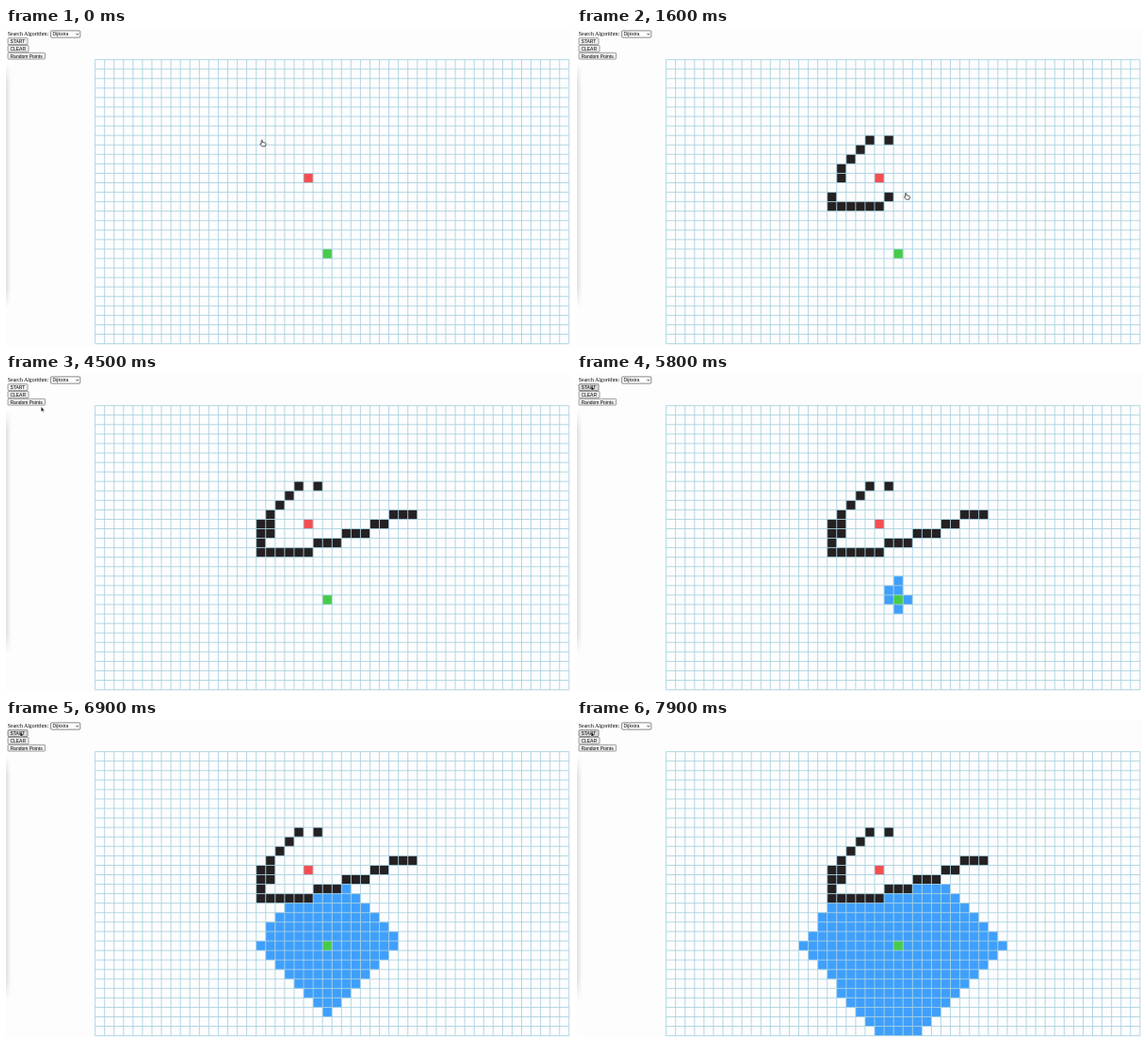
An HTML page that plays this animation: 600x338 px, repeating every 8 s.

```html
<!DOCTYPE html>
<html lang="en">
<head>
<meta charset="utf-8">
<title>Search visualizer</title>
<style>
  html, body { margin: 0; width: 100%; height: 100%; overflow: hidden; background: #fdfdfe; }
  svg { display: block; width: 600px; height: 338px; }
  .ui { font: 5px "Liberation Sans", Arial, sans-serif; fill: #000; }
  .label { font: 5.9px "Liberation Serif", "Times New Roman", serif; fill: #000; }
  .btn { fill: #efefef; stroke: #666; stroke-width: .6; }
  .btn.hover { fill: #dcdcdc; stroke: #444; }
</style>
</head>
<body>
<svg viewBox="0 0 600 338" xmlns="http://www.w3.org/2000/svg">
  <defs>
    <linearGradient id="fade">
      <stop offset="0" stop-color="#000" stop-opacity=".12"/>
      <stop offset=".5" stop-color="#000" stop-opacity=".05"/>
      <stop offset="1" stop-color="#000" stop-opacity="0"/>
    </linearGradient>
    <linearGradient id="ends" x2="0" y2="1">
      <stop offset="0" stop-color="#000"/>
      <stop offset=".08" stop-color="#fff"/>
      <stop offset=".92" stop-color="#fff"/>
      <stop offset="1" stop-color="#000"/>
    </linearGradient>
    <mask id="soft"><rect y="38" width="8" height="260" fill="url(#ends)"/></mask>
  </defs>
  <rect y="38" width="6" height="260" fill="url(#fade)" mask="url(#soft)"/>

  <text class="label" x="1.8" y="8.4">Search Algorithm:</text>
  <rect x="47.6" y="2.9" width="31.2" height="7.2" rx=".8" fill="#fff" stroke="#555" stroke-width=".7"/>
  <text class="ui" x="49.6" y="8.3">Dijkstra</text>
  <path d="M74.3 5.8l1.4 1.5 1.4-1.5" fill="none" stroke="#222" stroke-width=".8"/>

  <rect class="btn" id="start" x="2" y="10.7" width="21" height="6.8" rx=".8"/>
  <text class="ui" x="4.4" y="15.9">START</text>
  <rect class="btn" x="2" y="18.5" width="22" height="6.8" rx=".8"/>
  <text class="ui" x="4.4" y="23.7">CLEAR</text>
  <rect class="btn" x="2" y="26.3" width="39.5" height="6.8" rx=".8"/>
  <text class="ui" x="4.5" y="31.5">Random Points</text>

  <g id="cells"></g>
  <path id="lines" fill="none" stroke="#a6d0de" stroke-width=".85"/>

  <path id="hand" fill="#fff" stroke="#222" stroke-width=".75" stroke-linejoin="round"
    d="M-.6 .2Q0-.5 .6 .2V2.3L3.6 2.9Q4.4 3.2 4.3 4.1L3.6 6.6H.1L-1.8 4.2Q-1.8 3.3-.6 3.9Z"/>
  <path id="arrow" fill="#000" stroke="#fff" stroke-width=".5"
    d="M0 0V5.3L1.2 4.3 2 6.2 2.9 5.8 2.1 4H3.8Z"/>
</svg>
<script>
const LOOP = 8000, STEP = 100;
const COLS = 50, ROWS = 30, PITCH = 10.065, LEFT = 94.6, TOP = 33.65;
const SEARCH_AT = 5735, PER_CELL = 10, MAX_DIST = 12;
const GOAL = { c: 22, r: 12 }, ORIGIN = { c: 24, r: 20 };
const PEN = true;

// pointer key points: time, column, row, wall pen pressed
const keys = [
  [0, 17.1, 8.2], [200, 17.1, 8.2],
  [500, 23, 8, PEN], [550, 22, 8],
  [600, 21, 8, PEN], [900, 18, 11, PEN], [950, 18, 12, PEN], [975, 17.5, 13],
  [1000, 17, 14, PEN], [1100, 17, 15, PEN], [1400, 22, 15, PEN], [1500, 23, 14, PEN],
  [1600, 24.8, 13.8],
  [1610, 24, 14.07, PEN], [2000, 33, 10.65, PEN],
  [2200, 32.6, 11], [2900, 16.7, 13.1],
  [3000, 17, 13, PEN], [3100, 17, 12, PEN], [3200, 18, 13, PEN],
  [3500, 16.8, 12], [4400, -6.2, -.2], [4800, -6.2, -.2],
  [5500, -8.4, -2.4], [LOOP, -8.4, -2.4]
];

const $ = id => document.getElementById(id);
const px = c => LEFT + c * PITCH;
const py = r => TOP + r * PITCH;
const mix = (a, b, k) => a + (b - a) * k;
const id = (c, r) => `${c},${r}`;
const timed = [], walls = new Set();

function addCell({ c, r }, fill, at = 0) {
  const el = document.createElementNS("http://www.w3.org/2000/svg", "rect");
  const attrs = { x: px(c), y: py(r), width: PITCH, height: PITCH, fill };
  for (const k in attrs) el.setAttribute(k, attrs[k]);
  $("cells").append(el);
  if (at) timed.push({ el, at });
}

function addWall(col, row, at) {
  const c = Math.round(col), r = Math.round(row);
  if (walls.has(id(c, r))) return;
  walls.add(id(c, r));
  addCell({ c, r }, "#252022", at);
}

keys.forEach(([t, c, r, pen], i) => {
  if (!pen) return;
  const [t0, c0, r0, pen0] = keys[i - 1];
  const n = pen0 ? Math.round(Math.max(Math.abs(c - c0), Math.abs(r - r0))) : 1;
  for (let s = 1; s <= n; s++) addWall(mix(c0, c, s / n), mix(r0, r, s / n), mix(t0, t, s / n));
});

// Rings grow outwards; each closes at an angle that turns from south to west.
function rank({ c, r, d }) {
  const angle = Math.atan2(r - ORIGIN.r, c - ORIGIN.c);
  const close = Math.PI / 2 + 1.43 * ((d - 6) / 5) ** 3;
  return d + .4 * Math.cos(angle - close);
}

function searchOrder() {
  const seen = new Set([id(ORIGIN.c, ORIGIN.r)]);
  const queue = [{ ...ORIGIN, d: 0 }];
  for (const { c, r, d } of queue) {
    if (d === MAX_DIST) continue;
    for (const [dx, dy] of [[0, -1], [1, 0], [0, 1], [-1, 0]]) {
      const x = c + dx, y = r + dy, key = id(x, y);
      if (x < 0 || y < 0 || x >= COLS || y >= ROWS || seen.has(key) || walls.has(key)) continue;
      seen.add(key);
      queue.push({ c: x, r: y, d: d + 1 });
    }
  }
  return queue.sort((a, b) => rank(a) - rank(b));
}

searchOrder().forEach((cell, i) => addCell(cell, "#3f9ffc", SEARCH_AT + i * PER_CELL));
addCell(GOAL, "#f44e51");
addCell(ORIGIN, "#46cb49");

let d = "";
for (let i = 0; i <= COLS; i++) d += `M${px(i)} ${py(0)}V${py(ROWS)}`;
for (let i = 0; i <= ROWS; i++) d += `M${px(0)} ${py(i)}H${px(COLS)}`;
$("lines").setAttribute("d", d);

function pointerAt(t) {
  const i = keys.findIndex(k => k[0] > t);
  const [t0, c0, r0] = keys[i - 1], [t1, c1, r1] = keys[i];
  let k = (t - t0) / (t1 - t0);
  if (t1 - t0 > 400) k = k * k * (3 - 2 * k);
  return [px(mix(c0, c1, k) + .5), py(mix(r0, r1, k) + .3)];
}

function draw(t) {
  for (const { el, at } of timed) el.style.display = t >= at ? "" : "none";
  const [x, y] = pointerAt(t), onGrid = x > LEFT && y > TOP;
  for (const [name, on] of [["hand", onGrid], ["arrow", !onGrid]]) {
    $(name).style.display = on ? "" : "none";
    $(name).setAttribute("transform", `translate(${x} ${y})`);
  }
  $("start").classList.toggle("hover", x < 23 && y < 17.5);
}

const begin = performance.now();
function tick() {
  const t = (performance.now() - begin) % LOOP;
  draw(Math.floor(t / STEP) * STEP);
  requestAnimationFrame(tick);
}
tick();
</script>
</body>
</html>
```
